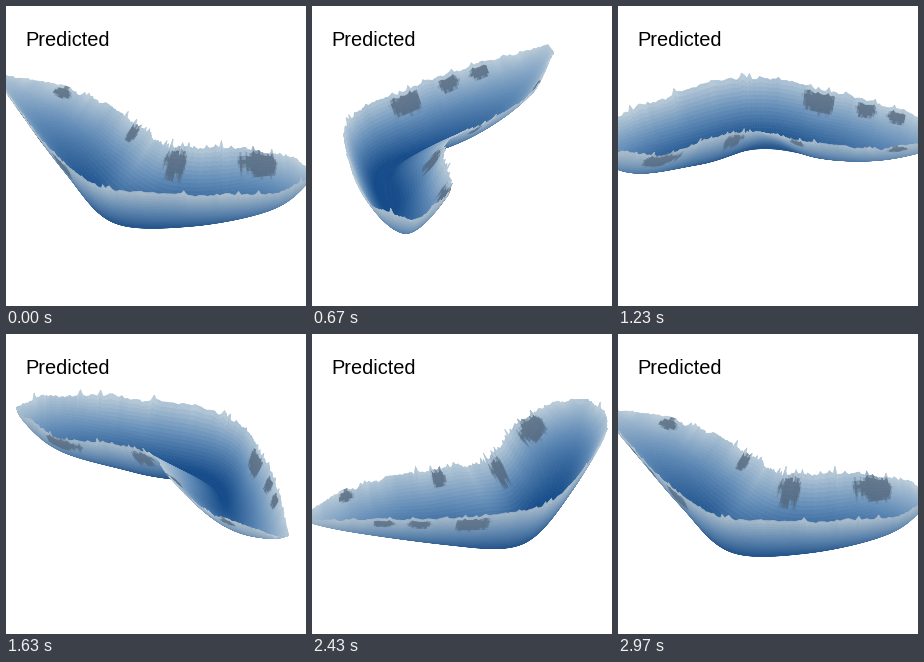
These frames come from a looping animation (300x300 px, 3 s). A matplotlib script:

```python
import numpy as np
import matplotlib.pyplot as plt
from matplotlib.animation import FuncAnimation
from matplotlib.collections import PolyCollection

SIZE, DPI = 300, 100
FRAMES, LOOP_MS = 90, 3000
TILT = np.radians(30)
CENTER = (150, 129)
MAX_DEPTH = 62
rng = np.random.default_rng(7)

# Key points of the two shores, from the right tip to the left one
OUTER_SHORE = np.array([(160, -80), (120, -114), (30, -120), (-55, -103),
                        (-105, -30), (-136, 46), (-160, 116)], float)
INNER_SHORE = np.array([(154, -66), (105, -30), (45, -27), (6, -14),
                        (-20, 26), (-72, 84), (-148, 119)], float)

# Grey areas on each wall: position along the shore, half length
OUTER_SPOTS = [(3.8, .21), (4.45, .13), (4.9, .11)]
INNER_SPOTS = [(1.05, .38), (2.5, .25), (3.9, .11), (5.25, .11)]
GREY = np.array([.29, .365, .45])


def bell(x, center, width):
    return np.exp(-((x - center) / width) ** 2)


def catmull(points, u):
    """Smooth curve through the points, u counted in points."""
    ext = np.vstack([2 * points[0] - points[1], points,
                     2 * points[-1] - points[-2]])
    i = np.minimum(u.astype(int), len(points) - 2)
    t = (u - i)[:, None]
    a, b, c, d = (ext[i + k] for k in range(4))
    return .5 * (2 * b + (c - a) * t + (2 * a - 5 * b + 4 * c - d) * t ** 2
                 + (3 * b - a - 3 * c + d) * t ** 3)


def rough(n, *octaves):
    """Sum of random curves given as (knots, amplitude)."""
    x = np.linspace(0, 1, n)
    return sum(amp * np.interp(x, np.linspace(0, 1, k), rng.uniform(-1, 1, k))
               for k, amp in octaves)


def ragged_rim(n):
    """Low waves with a few sharp peaks."""
    return rough(n, (20, 2.2), (70, 1.6), (n, .8)) + 6 * rng.random(n) ** 14


def build_wall(shore, middle, depth, power, w):
    rim = ragged_rim(len(shore))[:, None]
    reach = w * (1 + .01 * rim * w ** 8)
    xy = middle[:, None] + reach[..., None] * (shore - middle)[:, None]
    z = -depth[:, None] * (1 - w ** power[:, None]) + rim * w ** 10
    return np.dstack([xy, z])


def wall_colors(wall, u, w, spots):
    z = (wall[:-1, :-1, 2] + wall[1:, 1:, 2]) / 2
    u, w = (u[:-1] + u[1:])[:, None] / 2, (w[:-1] + w[1:])[None, :] / 2
    streak = rough(len(u), (30, .05), (90, .03))[:, None] * w ** 3
    t = np.clip(-z / MAX_DEPTH * 1.08 + .03 + streak, 0, 1)
    rim, mid, deep = np.array([(186, 204, 217), (98, 140, 183),
                               (22, 76, 138)]) / 255
    t = t[..., None]
    rgb = np.where(t < .5, rim + (mid - rim) * 2 * t,
                   mid + (deep - mid) * (2 * t - 1))
    ragged = (rough(len(u), (60, .3), (len(u), .15))[:, None]
              + rough(w.size, (14, .2))[None, :])
    for pos, half in spots:
        high = min(.05 + .4 * half, .15)
        dist = np.hypot((u - pos) / half, (w - .97 + high) / high)
        mix = .72 * np.clip(4 * (1.1 - dist + ragged), 0, 1)[..., None]
        rgb = rgb + mix * (GREY - rgb)
    return rgb.reshape(-1, 3)


def quads(grid):
    return np.stack([grid[:-1, :-1], grid[1:, :-1], grid[1:, 1:],
                     grid[:-1, 1:]], axis=2).reshape(-1, 4, grid.shape[-1])


def build_basin(nu=191, nw=21):
    u = np.linspace(0, len(OUTER_SHORE) - 1, nu)
    w = np.linspace(0, 1, nw) ** .85
    outer, inner = catmull(OUTER_SHORE, u), catmull(INNER_SHORE, u)
    spur = bell(u, 3.3, .7)
    middle = outer + (.43 - .1 * spur)[:, None] * (inner - outer)
    depth = MAX_DEPTH * np.abs(np.sin(np.pi * (u / u[-1]) ** .9)) ** .8
    faces, colors = [], []
    sides = ((outer, np.full(nu, 1.6), OUTER_SPOTS, 1),
             (inner, 1.7 - .8 * spur, INNER_SPOTS, -1))
    for shore, power, spots, turn in sides:
        wall = build_wall(shore, middle, depth, power, w)
        # same winding on both walls
        faces.append(quads(wall)[:, ::turn])
        colors.append(wall_colors(wall, u, w, spots))
    return np.concatenate(faces), np.concatenate(colors)


FACES, INSIDE = build_basin()
OUTSIDE = .8 * INSIDE + .2 * np.array([.40, .49, .58])

fig = plt.figure(figsize=(SIZE / DPI, SIZE / DPI), dpi=DPI, facecolor="white")
ax = fig.add_axes([0, 0, 1, 1])
ax.set(xlim=(0, SIZE), ylim=(SIZE, 0))
ax.axis("off")
basin = PolyCollection([], linewidths=.5)
ax.add_collection(basin, autolim=False)
ax.text(19.3, 40, "Predicted", family="Liberation Sans", size=20 * 72 / DPI,
        color="black", va="baseline")


def update(frame):
    a = 2 * np.pi * frame / FRAMES
    x, y, z = np.moveaxis(FACES, -1, 0)
    across = x * np.cos(a) + y * np.sin(a)
    away = y * np.cos(a) - x * np.sin(a)
    xy = np.stack([CENTER[0] + across,
                   CENTER[1] - away * np.sin(TILT) - z * np.cos(TILT)], -1)
    dist = (away * np.cos(TILT) - z * np.sin(TILT)).mean(axis=1)
    d1, d2 = xy[:, 2] - xy[:, 0], xy[:, 3] - xy[:, 1]
    from_above = d1[:, 0] * d2[:, 1] - d1[:, 1] * d2[:, 0] < 0
    rgb = np.where(from_above[:, None], INSIDE, OUTSIDE)
    order = np.argsort(-dist)
    basin.set_verts(xy[order])
    basin.set_facecolor(rgb[order])
    basin.set_edgecolor(rgb[order])
    return (basin,)


anim = FuncAnimation(fig, update, frames=FRAMES, interval=LOOP_MS / FRAMES,
                     init_func=lambda: update(0), repeat=True, repeat_delay=0,
                     blit=False)
plt.show()
```
